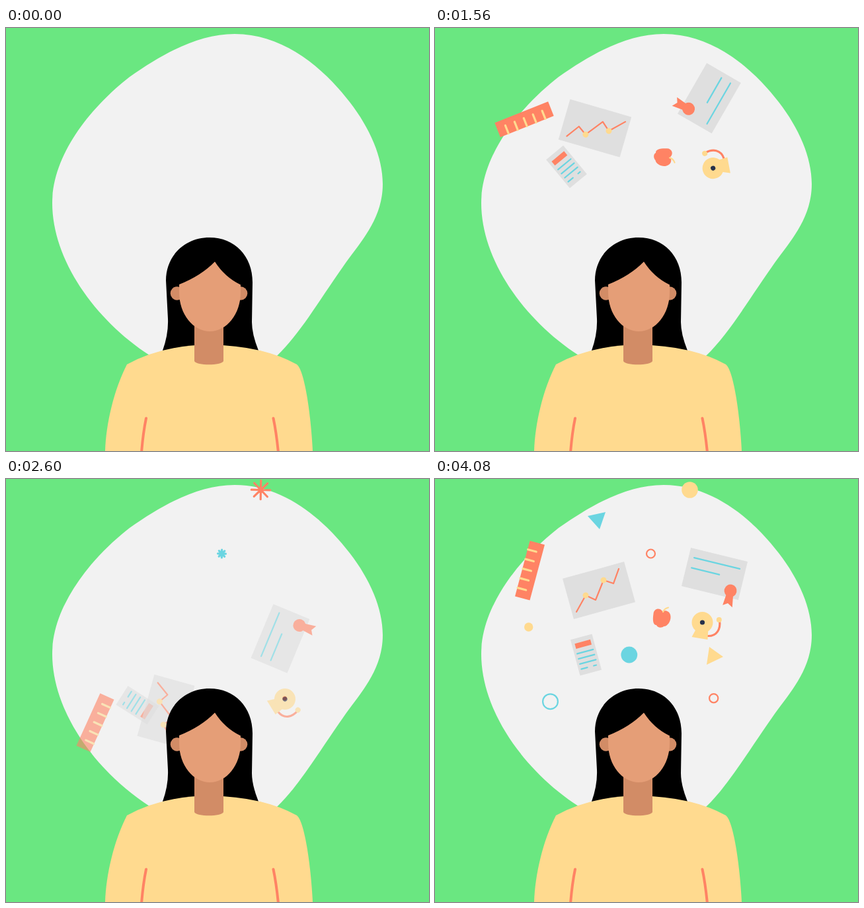
An HTML page for the animation above (5840 ms loop, 640 by 640 pixels).

```html
<!DOCTYPE html>
<html lang="en">
<head>
<meta charset="utf-8">
<title>Ideas overhead</title>
<style>
html, body { margin: 0; width: 100%; height: 100%; overflow: hidden; background: #6ae781; }
svg { display: block; width: 100%; height: 100%; }
.paper { fill: #dfdfdf; }
.red { fill: #ff8364; }
.sun { fill: #ffda8f; }
.aqua { fill: #6bd5e1; }
.line { fill: none; stroke-linecap: round; stroke-linejoin: round; stroke-width: 2.2; }
.line.red { stroke: #ff8364; }
.line.sun { stroke: #ffda8f; }
.line.aqua { stroke: #6bd5e1; }
.line.gold { stroke: #d4a636; }
.thick { stroke-width: 3.2; }
</style>
</head>
<body>
<svg viewBox="0 0 640 640">
  <rect width="640" height="640" fill="#6ae781"/>
  <path fill="#f2f2f2" d="M346 9C420 9 480 60 520 112C551 152 570 196 570 236C570 290 535 325 510 361C470 418 445 462 410 496L217 495C134 441 70 350 70 265C70 192 128 120 187 74C240 37 292 9 346 9Z"/>

  <g id="marks">
    <circle class="sun" r="12.3"/>
    <circle class="line red" r="6.5"/>
    <circle class="line red" r="6.6"/>
    <circle class="aqua" r="12.4"/>
    <circle class="sun" r="6.7"/>
    <path class="sun" d="M-6 -14L15 1L-10 13Z"/>
    <circle class="line aqua" r="11.4"/>
    <path class="aqua" d="M-14.5 -6L12.5 -12L3.5 14Z"/>
  </g>
  <g id="bursts"></g>

  <g>
    <g id="receipt">
      <rect class="paper" x="-16.8" y="-28" width="33.6" height="56"/>
      <rect class="red" x="-12.2" y="-20.7" width="24.4" height="8"/>
      <path class="line aqua" stroke-linecap="butt" d="M-12.5 -5H12.5M-12.5 3H12.5M-12.5 11H12.5M-12.5 19H-3M7 19H11"/>
    </g>
    <g id="ruler">
      <rect class="red" x="-11.6" y="-43.5" width="23.2" height="87"/>
      <path class="line sun thick" d="M-11 -30H2M-11 -15H2M-11 0H2M-11 15H2M-11 30H2"/>
    </g>
    <g id="graph">
      <rect class="paper" x="-48.3" y="-31.7" width="96.6" height="63.4"/>
      <path class="line red" d="M-41.4 22.2L-21.3 1.9L-8.7 12.6L10.9 -13.1L24 -4.2L37.6 -23.3"/>
      <circle class="sun" cx="-21.3" cy="1.9" r="4.5"/>
      <circle class="sun" cx="10.9" cy="-13.1" r="4.5"/>
    </g>
    <g id="apple">
      <path class="red" d="M1 -10C-3 -16 -12 -14 -12.5 -6C-14 4 -13 11 -8 11C-6 16 1 15 3 13C9 13 14 5 13.5 -2C13 -10 6 -12 1 -10Z"/>
      <path class="line sun" d="M2 -9Q4 -14 10 -15.5"/>
    </g>
    <g id="award">
      <rect class="paper" x="-44.2" y="-29.8" width="88.4" height="59.6"/>
      <path class="line aqua" d="M-35.8 -16.4H35.2M-36 -.6H7.2"/>
      <path class="red" d="M25 22L23 43L30 38.5L38 43L34.5 22Z"/>
      <circle class="red" cx="29.4" cy="19.1" r="9.5"/>
    </g>
    <g id="tape">
      <path class="line red thick" d="M8 20.5C22 21 28 10 26 -3"/>
      <path class="sun" d="M-16 22L8 26L9 8L-9 9Z"/>
      <circle class="sun" r="16"/>
      <circle fill="#26304a" r="3.6"/>
      <circle class="sun" cx="25.3" cy="-4" r="4"/>
    </g>
  </g>

  <path d="M237 488Q246 463 245 440L242 382C242 345 270 317 308 317C346 317 373 345 373 385L372 445Q372 463 382 488L370 520H250Z"/>
  <path class="sun" d="M183 509Q236 480 308 479Q390 481 440 509C451 517 461 580 464 640H150C151 600 163 548 183 509Z"/>
  <g fill="#d28c66">
    <circle cx="259" cy="401.5" r="10.3"/>
    <circle cx="355" cy="401.5" r="10.3"/>
    <path d="M285 430H329V504C326 511 288 511 285 504Z"/>
  </g>
  <path fill="#e59e77" d="M316 353.5Q331 377 355 388.5V400C355 432.6 334 459 308.500 459C283 459 262 432.6 262 400V388Q295 375 316 353.500Z"/>
  <path class="line red" style="stroke-width:4" d="M212 590.5Q207.5 612 205 642M404.5 590.5Q409 612 412 642"/>
</svg>
<script>
const LOOP = 5840, STEP = 40, HOLD = 4080;
const APEX = 1160, FLOOR = 406, FADE = 2520, POP = 3200, PEAK = 3620;
const BURST = 2472, STAGGER = 50, BURST_TIME = 480;

// Each thing is thrown from (from, FLOOR) to (x, top), then falls `drop` during the next APEX ms.
// `rise` sets how quickly it is thrown; `spin` is in degrees per second.
const ITEMS = {
  receipt: { from: 265, x: 199, top: 199, drop: 93, rise: 258, turn: 77, spin: 156, rest: [228.5, 266, -15] },
  ruler: { from: 325, x: 135, top: 119, drop: 162, rise: 295, turn: 134, spin: 304, kick: 260, rest: [143.5, 138.5, 15] },
  graph: { from: 290, x: 242, top: 135, drop: 140, rise: 296, turn: 62, spin: 86, rest: [248, 168.5, -15.5] },
  apple: { from: 304, x: 346, top: 161, drop: 290, rise: 397, turn: 30, spin: 34, rest: [343, 210, 0] },
  award: { from: 312, x: 415, top: 95, drop: 95, rise: 426, turn: 221, spin: 166, kick: 134, rest: [423, 143.5, 13.7] },
  tape: { from: 345, x: 422, top: 202, drop: 85, rise: 610, turn: 11, spin: 153, rest: [404.5, 217, 0] }
};

// In the order their bursts go off
const MARKS = [
  { x: 385.5, y: 16.5, reach: 32, ink: 'red' },
  { x: 326.5, y: 113, reach: 22, ink: 'aqua' },
  { x: 421.7, y: 331.7, reach: 20, ink: 'red', late: true },
  { x: 293.8, y: 266, reach: 28, ink: 'gold' },
  { x: 141.7, y: 224, reach: 24, ink: 'aqua', late: true },
  { x: 421, y: 268, reach: 22, ink: 'aqua' },
  { x: 174.5, y: 336.7, reach: 22, ink: 'red' },
  { x: 245.5, y: 62 }
];

const $ = id => document.getElementById(id);
const ramp = (t, a, b) => Math.max(0, Math.min(1, (t - a) / (b - a)));
const smooth = p => p * p * (3 - 2 * p);
const decay = (t, tau, power) => Math.exp(-((t / tau) ** power));

const shapes = [...$('marks').children];
const bursts = MARKS.map(({ ink }) => {
  const el = document.createElementNS('http://www.w3.org/2000/svg', 'path');
  el.setAttribute('class', `line thick ${ink}`);
  return $('bursts').appendChild(el);
});

function place(el, x, y, turn, scale, alpha) {
  el.setAttribute('transform', `translate(${x} ${y}) rotate(${turn}) scale(${scale})`);
  el.setAttribute('opacity', alpha);
  el.setAttribute('visibility', scale > 0 && alpha > 0 ? 'visible' : 'hidden');
}

function toss(it, t) {
  const left = decay(t, it.rise, 3);
  const fall = Math.max(0, t / APEX - 1);
  return [
    it.x + (it.from - it.x) * decay(t, it.rise, 1.5),
    it.top + (FLOOR - it.top) * left + it.drop * fall * fall,
    it.turn + it.spin * t / 1000 - (it.kick || 0) * left
  ];
}

const popScale = t => 1.28 * smooth(ramp(t, POP, PEAK)) - 0.28 * smooth(ramp(t, PEAK, HOLD));

function rays(inner, outer) {
  let d = '';
  for (let i = 0; i < 8; i++) {
    const a = i * Math.PI / 4 + 0.02, c = Math.cos(a), s = Math.sin(a);
    d += `M${c * inner} ${s * inner}L${c * outer} ${s * outer}`;
  }
  return d;
}

function draw(t) {
  for (const [id, it] of Object.entries(ITEMS)) {
    if (t < POP) place($(id), ...toss(it, t), t > 0 ? 1 : 0, 1 - ramp(t, FADE, FADE + 200));
    else place($(id), ...it.rest, popScale(t), 1);
  }
  MARKS.forEach(({ x, y, reach, late }, i) => {
    const start = late ? 2880 : 2700, shown = ramp(t, start, start + 200);
    place(shapes[i], x, y, 0, 0.6 + 0.4 * shown, shown);
    if (!reach) return;
    const p = (t - BURST - i * STAGGER) / BURST_TIME;
    place(bursts[i], x, y, 0, 1, p > 0 && p < 1 ? 1 : 0);
    bursts[i].setAttribute('d', rays(reach * ramp(p, 0.4, 1), reach * ramp(p, 0, 0.6)));
  });
}

const begin = performance.now();
function tick() {
  const t = (performance.now() - begin) % LOOP;
  draw(Math.min(HOLD, Math.floor(t / STEP) * STEP));
  requestAnimationFrame(tick);
}
tick();
</script>
</body>
</html>
```
